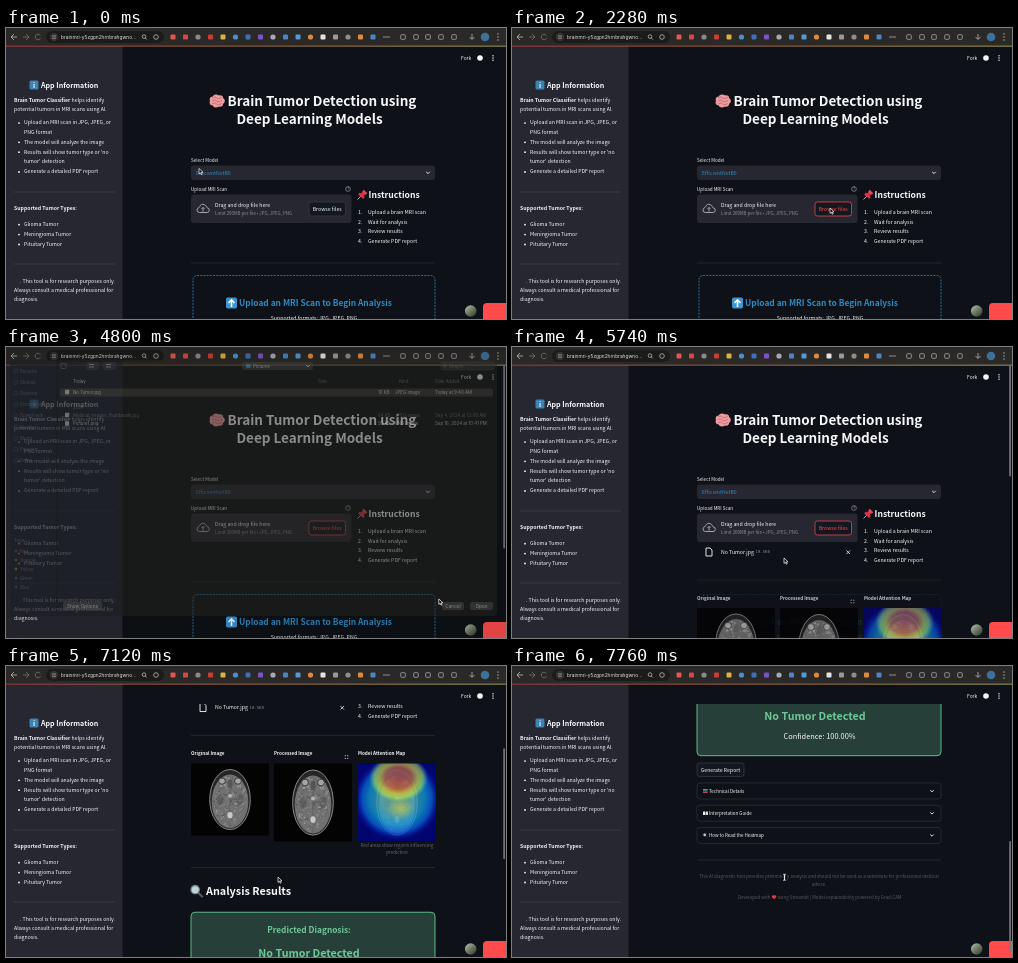
Recreate the animation shown at these times as an HTML page with a canvas. Size 500 by 291 pixels, loop 8 s.

```html
<!DOCTYPE html>
<html lang="en">
<head>
<meta charset="utf-8">
<title>Brain Tumor Detection</title>
<style>
html, body { margin: 0; width: 100%; height: 100%; overflow: hidden; background: #0e1117; }
canvas { display: block; width: 500px; height: 291px; }
</style>
</head>
<body>
<canvas id="stage"></canvas>
<script>
const W = 500, H = 291, LOOP = 8000;
const canvas = document.getElementById('stage');
const ratio = window.devicePixelRatio || 1;
canvas.width = W * ratio;
canvas.height = H * ratio;
const c = canvas.getContext('2d');

const SANS = '"Noto Sans CJK JP","Noto Sans CJK SC","Noto Sans CJK KR","Noto Sans CJK","Open Sans",sans-serif';
const UI = 'Inter,Roboto,sans-serif';
const MONO = '"Noto Sans Mono","DejaVu Sans Mono",monospace';
const WHITE = '#f7f8fa', GREY = '#8b8d95', PANEL = '#262730', BG = '#0e1117';
const RED = '#ff4b4b', BLUE = '#2d8bc5', GREEN = '#6fc897', EDGE = '#3b3d46';

const SCROLL = [[6050, 0], [6500, 66], [6760, 66], [6800, 75], [7120, 163], [7420, 300], [7560, 300], [7760, 401]];
const POINTER = [[180, 193, 140.5], [980, 243, 151.5], [1220, 246, 152.5], [1900, 318, 180], [2700, 318, 180],
  [3440, 266.5, 158.5], [3850, 85, 46], [4150, 85, 46], [4550, 474, 258], [4650, 474, 258],
  [4800, 433, 252], [5600, 272, 211]];
const DIALOG = [[2850, 0], [3440, .62], [3800, .85], [4350, .85], [4800, .45], [5100, 0]];
const RESULTS = [[5300, 0], [5850, 1]];

// Linear interpolation through [time, ...values] rows.
function track(rows, t) {
  if (t <= rows[0][0]) return rows[0].slice(1);
  for (let i = 1; i < rows.length; i++) {
    const a = rows[i - 1], b = rows[i];
    if (t <= b[0]) {
      const k = (t - a[0]) / (b[0] - a[0]);
      return a.slice(1).map((v, j) => v + (b[j + 1] - v) * k);
    }
  }
  return rows[rows.length - 1].slice(1);
}

function text(s, x, y, size, o = {}) {
  c.font = `${o.bold ? 700 : 400} ${size}px ${o.font || SANS}`;
  c.fillStyle = o.color || WHITE;
  c.textAlign = o.align || 'left';
  c.fillText(s, x, y + size * .36);
  return c.measureText(s).width;
}

function box(x, y, w, h, r, fill, stroke, line = .7) {
  c.beginPath();
  c.roundRect(x, y, w, h, r);
  if (fill) { c.fillStyle = fill; c.fill(); }
  if (stroke) { c.strokeStyle = stroke; c.lineWidth = line; c.stroke(); }
}

function oval(x, y, rx, ry, fill, stroke, line = .8) {
  c.beginPath();
  c.ellipse(x, y, rx, ry, 0, 0, 7);
  if (fill) { c.fillStyle = fill; c.fill(); }
  if (stroke) { c.strokeStyle = stroke; c.lineWidth = line; c.stroke(); }
}

function line(points, color, width = .8) {
  c.beginPath();
  points.forEach(([x, y], i) => i ? c.lineTo(x, y) : c.moveTo(x, y));
  c.strokeStyle = color;
  c.lineWidth = width;
  c.stroke();
}

function faded(alpha, draw) {
  if (alpha <= 0) return;
  c.save();
  c.globalAlpha *= Math.min(1, alpha);
  draw();
  c.restore();
}

function gradient(g, stops) {
  stops.forEach(([k, v]) => g.addColorStop(k, v));
  return g;
}

const rule = (x, y, w, color = '#2b2e37') => line([[x, y], [x + w, y]], color, .7);
const chevron = (x, y) => line([[x - 1.8, y - .9], [x, y + .9], [x + 1.8, y - .9]], WHITE, .9);

function brainIcon(x, y) {
  for (let i = 0; i < 7; i++) {
    const a = i * .9;
    oval(x + Math.cos(a) * 4.5, y + Math.sin(a) * 3.6, 3.3, 3, '#ee9d9f');
  }
  oval(x, y, 4.5, 4, '#ee9d9f');
  for (let i = -1; i < 2; i++) {
    line([[x - 5, y + i * 3], [x - 2, y + i * 3 - 1.2], [x + 1, y + i * 3 + 1], [x + 5, y + i * 3 - .5]], '#bc6973', .8);
  }
}

function pinIcon(x, y) {
  line([[x - 4.5, y + 4.5], [x, y]], '#b9c0c8', .9);
  line([[x - 3, y - 1.5], [x + 2, y + 3]], '#dd3344', 2.4);
  line([[x - 1, y + 1], [x + 3, y - 3]], '#dd3344', 3.6);
  line([[x + 1, y - 4.5], [x + 4.5, y - 1]], '#ee4656', 2.2);
}

function lensIcon(x, y, r) {
  line([[x, y], [x + r * 1.6, y + r * 1.6]], '#555b63', r * .5);
  oval(x - r * .2, y - r * .2, r, r, '#bcd3de', '#747c84', r * .3);
}

function arrowIcon(x, y) {
  box(x - 5.5, y - 5.5, 11, 11, 1.8, '#3b94d4');
  line([[x, y + 4], [x, y - 3]], '#fff', 1.6);
  line([[x - 3, y], [x, y - 3.2], [x + 3, y]], '#fff', 1.5);
}

function browserBar() {
  box(0, 0, W, 18, 0, '#2a2927');
  const icon = '#b9b8b5';
  line([[11, 9], [5, 9], [8, 6]], icon);
  line([[5, 9], [8, 12]], icon);
  line([[17, 9], [23, 9], [20, 6]], '#74736f');
  line([[23, 9], [20, 12]], '#74736f');
  c.beginPath(); c.arc(32, 9, 2.8, .4, 5.7); c.stroke();
  box(40, 3, 118, 12, 6, '#1b1b1a');
  oval(48, 9, 4.2, 4.2, '#343331');
  line([[46, 8], [50, 8]], icon, .7);
  line([[46, 10.2], [50, 10.2]], icon, .7);
  text('brainmri-y5zgpn2hrnbrahgwno...', 55, 9, 4.8, { font: UI, color: '#deddda' });
  oval(138, 8.6, 1.8, 1.8, null, icon);
  line([[139.3, 10], [140.8, 11.5]], icon);
  oval(150, 9, 2.3, 2.3, null, icon);
  const tints = ['#e0574f', '#d84747', '#8b8b8b', '#c93d35', '#d9b13f', '#4a90d0', '#3f6fb5', '#7c53c7', '#a7abb0',
    '#4a86c5', '#4f9bd8', '#dd8a3e', '#e4e4e2', '#9a9a98', '#8e8e88', '#dd8a3e', '#4a86c5'];
  tints.forEach((tint, i) => i % 3 === 2
    ? oval(167 + i * 12.5, 9, 2.6, 2.6, tint)
    : box(164.5 + i * 12.5, 6.5, 5, 5, 1, tint));
  rule(377, 9, 7, icon);
  [397, 410, 422, 435, 448].forEach(x => box(x - 2.3, 6.7, 4.6, 4.6, .8, null, icon));
  line([[466, 6], [466, 11]], icon);
  line([[463.5, 9], [466, 11.5], [468.5, 9]], icon);
  oval(479, 9, 4.3, 4.3, '#3e7199');
  [6, 9, 12].forEach(y => oval(492, y, .7, .7, icon));
  const strip = gradient(c.createLinearGradient(0, 0, W, 0), [[0, '#c63f3d'], [1, '#c9c66a']]);
  box(0, 17.8, W, .8, 0, strip);
}

function sidebar() {
  box(0, 18, 116.5, H - 18, 0, PANEL);
  box(23.5, 52.5, 9, 9, 1.5, '#3b83b2');
  text('i', 28, 57, 7, { bold: true, align: 'center' });
  text('App Information', 35, 57, 7.1, { bold: true });
  const w = text('Brain Tumor Classifier', 8, 72, 5.2, { bold: true });
  text(' helps identify', 8 + w, 72, 5.2);
  text('potential tumors in MRI scans using AI.', 8, 81.5, 5.2);
  const item = (s, y, dot = true) => {
    if (dot) oval(13, y + .5, .9, .9, WHITE);
    text(s, 18, y, 5.2);
  };
  item('Upload an MRI scan in JPG, JPEG, or', 94.6);
  item('PNG format', 104.1, false);
  item('The model will analyze the image', 113.8);
  item('Results will show tumor type or \'no', 123.7);
  item('tumor\' detection', 133.2, false);
  item('Generate a detailed PDF report', 143.5);
  rule(8, 164, 101, '#42444c');
  text('Supported Tumor Types:', 8, 180, 5.2, { bold: true });
  ['Glioma Tumor', 'Meningioma Tumor', 'Pituitary Tumor'].forEach((s, i) => item(s, 196.2 + i * 9.9));
  rule(8, 236, 101, '#42444c');
  text('. This tool is for research purposes only.', 14, 253.5, 5.2);
  text('Always consult a medical professional for', 8, 262, 5.2);
  text('diagnosis.', 8, 271, 5.2);
}

function form(active) {
  brainIcon(211, 73);
  text('Brain Tumor Detection using', 221.5, 73, 13.5, { bold: true });
  text('Deep Learning Models', 303.5, 91.5, 13.5, { bold: true, align: 'center' });
  text('Select Model', 185, 132, 4.6);
  box(185, 137.5, 244, 14.5, 3, PANEL);
  text('EfficientNetB0', 190, 144.8, 5.2, { color: BLUE });
  chevron(422, 144.7);
  text('Upload MRI Scan', 185, 161, 4.6);
  oval(342, 161, 2.4, 2.4, null, '#a5a7ae', .6);
  text('?', 342, 161, 3.6, { align: 'center', color: '#c4c5ca' });
  box(185, 166.5, 160.5, 28.5, 3, PANEL);
  const cloud = '#a5a8b0';
  c.beginPath();
  c.arc(193.5, 182, 2.5, 1.6, 4.5);
  c.arc(197, 180, 3.6, 3.5, 5.9);
  c.arc(201, 182.2, 2.3, 4.8, 1.5);
  c.closePath();
  c.strokeStyle = cloud; c.lineWidth = 1; c.stroke();
  line([[197, 183.5], [197, 179.5]], cloud, 1);
  line([[195.4, 181], [197, 179.4], [198.6, 181]], cloud, .9);
  text('Drag and drop file here', 209, 177, 5.2);
  text('Limit 200MB per file • JPG, JPEG, PNG', 209, 185.5, 4.45, { color: GREY });
  box(303, 174, 36.5, 14, 2.5, '#131720', active ? RED : EDGE);
  text('Browse files', 321.2, 181, 5.2, { align: 'center', color: active ? RED : WHITE });
  pinIcon(356, 167);
  text('Instructions', 362.6, 167, 8.6, { bold: true });
  ['Upload a brain MRI scan', 'Wait for analysis', 'Review results', 'Generate PDF report'].forEach((s, i) => {
    text(`${i + 1}.`, 352, 184 + i * 9.7, 5.2);
    text(s, 362, 184 + i * 9.7, 5.2);
  });
}

function invitation() {
  rule(185, 235, 244);
  c.setLineDash([2, 1.2]);
  box(187, 247.5, 242, 80, 4, null, BLUE, .8);
  c.setLineDash([]);
  arrowIcon(225.5, 275);
  text('Upload an MRI Scan to Begin Analysis', 233, 275, 8.4, { bold: true, color: BLUE });
  text('Supported formats: JPG, JPEG, PNG', 308, 290, 5.2, { align: 'center' });
}

function scan(x, y, w, h) {
  box(x, y, w, h, 1, '#030303');
  c.save();
  c.translate(x + w * .5, y + h * .5);
  c.scale(w / 78, h / 78);
  oval(0, 0, 20.3, 32.5, '#262626', '#8c8c8c', 1);
  oval(0, 2, 18.3, 29, '#707070');
  let seed = 7;
  const rnd = () => (seed = (seed * 16807) % 2147483647) / 2147483647;
  for (let i = 0; i < 260; i++) {
    const a = rnd() * 6.28, d = Math.sqrt(rnd()) * .95;
    const px = Math.cos(a) * 17.5 * d, py = 2 + Math.sin(a) * 28 * d, turn = rnd() * 6.28, l = 1 + rnd() * 2;
    const v = 80 + rnd() * 85 | 0;
    line([[px, py], [px + Math.cos(turn) * l, py + Math.sin(turn) * l]], `rgb(${v},${v},${v})`, 1);
  }
  [-1, 1].forEach(s => {
    oval(s * 8, -20, 3.4, 3.4, '#a5a5a5', '#3a3a3a', 1);
    oval(s * 10, 0, 3.5, 6, 'rgba(70,70,70,.4)');
  });
  line([[0, -12], [0, 30]], 'rgba(60,60,60,.5)', .7);
  oval(0, -17, 2.4, 5, '#555');
  oval(0, -4, 2, 2, '#b5b5b5');
  oval(0, 17, 2.6, 3.4, '#c9c9c9');
  c.restore();
}

function heatmap(x, y, s) {
  scan(x, y, s, s);
  const glow = (cx, cy, rx, ry, stops) => {
    c.save();
    c.translate(x + cx * s, y + cy * s);
    c.scale(rx * s, ry * s);
    c.fillStyle = gradient(c.createRadialGradient(0, 0, 0, 0, 0, 1), stops);
    c.fillRect(-1, -1, 2, 2);
    c.restore();
  };
  c.save();
  c.beginPath(); c.rect(x, y, s, s); c.clip();
  faded(.55, () => {
    box(x, y, s, s, 0, '#0508c8');
    glow(.5, .45, .56, .54, [[0, '#9cf070'], [.35, '#70f0a0'], [.62, '#18dcea'], [.8, '#0a86f5'], [1, 'rgba(5,8,200,0)']]);
    glow(.52, .19, .38, .3, [[0, '#d80800'], [.45, '#f03800'], [.65, '#ffc800'], [.82, 'rgba(230,255,40,.8)'], [1, 'rgba(130,255,120,0)']]);
    glow(.55, .58, .18, .14, [[0, 'rgba(255,230,40,.8)'], [1, 'rgba(255,230,40,0)']]);
  });
  c.restore();
}

function fileRow() {
  line([[194, 201], [198, 201], [200, 203], [200, 209], [194, 209], [194, 201]], WHITE, .9);
  text('No Tumor.jpg', 209, 205, 5.2);
  text('18.5KB', 243.5, 205, 4, { font: MONO, color: GREY });
  line([[334.5, 203.5], [338, 207]], WHITE);
  line([[338, 203.5], [334.5, 207]], WHITE);
}

function results() {
  rule(185, 233, 244);
  const head = { bold: true };
  text('Original Image', 185, 251, 4.65, head);
  text('Processed Image', 268, 251, 4.65, head);
  text('Model Attention Map', 352, 251, 4.65, head);
  c.setLineDash([1.4, 1.6]);
  c.lineDashOffset = .7;
  line([[339, 253], [342, 253], [342, 256], [339, 256], [339, 253]], WHITE, .7);
  c.setLineDash([]);
  scan(185, 261, 78, 72);
  scan(268, 261, 78, 78);
  heatmap(352, 261, 78);
  const note = { align: 'center', color: '#666974' };
  text('Red areas show regions influencing', 391, 342.7, 4.45, note);
  text('prediction', 391, 350, 4.45, note);
  rule(185, 365, 244);
  lensIcon(190, 388, 4.2);
  text('Analysis Results', 200, 389, 10.8, head);
  box(185, 409.7, 244, 81, 4, '#263f38', '#5bbd84', 1);
  const good = { bold: true, align: 'center', color: GREEN };
  text('Predicted Diagnosis:', 303, 427, 8.3, good);
  text('No Tumor Detected', 303, 451, 10.7, good);
  text('Confidence: 100.00%', 307.5, 471, 7.4, { align: 'center' });
  box(185, 498, 47, 13.5, 2.5, '#131720', EDGE);
  text('Generate Report', 208.5, 504.7, 5.2, { align: 'center' });
  ['Technical Details', 'Interpretation Guide', 'How to Read the Heatmap'].forEach((s, i) => {
    const y = 526 + i * 22.2;
    box(185, y - 8, 244, 16, 3, null, '#30333c');
    if (i === 0) ['#58a866', '#4b83c4', '#d05545'].forEach((v, j) => box(191, y - 2 + j * 1.4, 4.6, 1.1, 0, v));
    if (i === 1) { box(191, y - 1.6, 2.3, 3.5, .3, '#e9e9e9'); box(193.7, y - 1.6, 2.3, 3.5, .3, '#d8d8d8'); }
    if (i === 2) lensIcon(193, y - .3, 1.4);
    text(s, 197, y, 4.5);
    chevron(420, y);
  });
  rule(185, 595, 244);
  const foot = { align: 'center', color: '#565962' };
  text('This AI diagnostic tool provides preliminary analysis and should not be used as a substitute for professional medical', 307, 611, 4.48, foot);
  text('advice.', 307, 619, 4.48, foot);
  const left = 'Developed with ', right = ' using Streamlit | Model explainability powered by Grad-CAM';
  const w = text(left, 226, 632, 4.48, { color: foot.color });
  const hx = 226 + w;
  oval(hx + 1.5, 631.5, 1.2, 1.2, '#e23b45');
  oval(hx + 3.5, 631.5, 1.2, 1.2, '#e23b45');
  c.beginPath(); c.moveTo(hx + .4, 632); c.lineTo(hx + 4.6, 632); c.lineTo(hx + 2.5, 634.3); c.fill();
  text(right, hx + 5, 632, 4.48, { color: foot.color });
}

function overlay() {
  text('Fork', 455, 30, 4.9);
  oval(474, 30, 2.8, 2.8, WHITE);
  [27.8, 30, 32.2].forEach(y => oval(487, y, .7, .7, WHITE));
  oval(464.7, 283, 5.8, 5.8, gradient(c.createLinearGradient(459, 277, 470, 289),
    [[0, '#b8c6bd'], [.5, '#6d7b60'], [1, '#2e3530']]));
  box(477, 275, 30, 24, 4, RED);
}

function scrollbar(scroll, long) {
  box(497.3, 18.5 + scroll * .39, 1.6, long ? 111 : 183, .8, '#7b7c81');
}

function dialogPanel() {
  box(4, 13, 487, 256, 4, '#282620');
  box(4, 13, 112, 256, 4, '#181b2c');
  line([[51, 13], [51, 269]], '#11110f');
}

function dialogContent(selected) {
  const small = (s, x, y, color = '#e5e5e2') => text(s, x, y, 4.4, { font: UI, color });
  const dim = '#85857f', faint = '#70727c';
  ['Recents', 'Shared', 'Desktop', 'Documents', 'Downloads', 'Movies', 'Music', 'Pictures', 'Home'].forEach((s, i) => {
    const y = 24 + i * 11.2;
    box(8, y - 1.8, 3.6, 3.6, .8, null, '#355779');
    small(s, 14, y, faint);
  });
  small('Tags', 8, 193, faint);
  ['Red', 'Orange', 'Yellow', 'Green', 'Blue'].forEach((s, i) => {
    const y = 204 + i * 9;
    oval(10, y, 1.4, 1.4, ['#8d3c36', '#8d642e', '#857a33', '#3b6d42', '#31587e'][i]);
    small(s, 14, y, faint);
  });
  box(55, 16.5, 5, 5, 1, null, dim);
  [80, 97].forEach(x => {
    box(x, 15, 13, 8, 2, '#3a3a37');
    [17.5, 20].forEach(y => rule(x + 3, y, 5, '#ddd'));
  });
  box(236, 15, 71, 8, 2, '#42423f');
  box(240, 17.2, 4.5, 3.5, .6, '#4b9bd2');
  small('Pictures', 247, 19);
  chevron(302, 19);
  box(435, 15, 53, 8, 2, '#32322f', '#4d4d49', .5);
  oval(439, 18.7, 1.4, 1.4, null, dim, .6);
  small('Search', 443, 19, dim);
  small('Today', 67, 34);
  [['Size', 312], ['Kind', 393], ['Date Added', 429]].forEach(([s, x]) => small(s, x, 34, dim));
  if (selected) box(54, 41.5, 433, 8, 2, '#45453f');
  const row = (name, y, size, kind, date, tone) => {
    box(59, y - 2.2, 4.2, 4.4, .4, '#d5d5d5');
    small(name, 67, y, tone);
    small(size, 372, y, tone);
    small(kind, 389, y, tone);
    small(date, 429, y, tone);
  };
  row('No Tumor.jpg', 45, '10 KB', 'JPEG image', 'Today at 9:40 AM');
  small('2024', 67, 60, dim);
  row('Medical_images_thumbnails.jpg', 68, '64 KB', 'JPEG image', 'Sep 4, 2024 at 12:00 AM', dim);
  row('Picture1.png', 76.5, '92 KB', 'PNG image', 'Sep 16, 2024 at 10:41 PM');
  const button = (s, x, w, color) => {
    box(x, 255, w, 8, 2, '#50504d');
    text(s, x + w / 2, 259, 4.7, { font: UI, align: 'center', color });
  };
  button('Show Options', 57, 39, '#f2f2ef');
  button('Cancel', 436, 22, '#f2f2ef');
  button('Open', 464, 23, selected ? '#fff' : '#777772');
}

function pointer(x, y, beam) {
  if (beam) {
    line([[x + .5, y - 2.5], [x + .5, y + 3]], '#fff', .9);
    [-2.7, 3.2].forEach(d => rule(x - 1, y + d, 3, '#fff'));
    return;
  }
  c.beginPath();
  [[0, 0], [0, 5.4], [1.3, 4.2], [2.2, 6.2], [3.2, 5.8], [2.3, 3.9], [4, 3.8]].forEach(([a, b]) => c.lineTo(x + a, y + b));
  c.closePath();
  c.fillStyle = '#080808';
  c.fill();
  c.strokeStyle = '#fff';
  c.lineWidth = .7;
  c.stroke();
}

function render(t) {
  c.setTransform(ratio, 0, 0, ratio, 0, 0);
  box(0, 0, W, H, 0, BG);

  const [ready] = track(RESULTS, t);
  const [scroll] = track(SCROLL, t);
  c.save();
  c.beginPath(); c.rect(117, 38, W - 117, H - 38); c.clip();
  c.translate(0, -scroll);
  form(t >= 1000);
  faded(1 - ready, invitation);
  if (t >= 5150) fileRow();
  faded(ready, results);
  c.restore();

  sidebar();
  browserBar();
  overlay();
  // The scrollbar appears with the first layout change and stays while reading.
  if (t >= 2850) scrollbar(scroll, ready > 0);

  const [shown] = track(DIALOG, t);
  faded(shown * .25, () => box(0, 0, W, H, 0, '#000'));
  faded(shown, dialogPanel);
  faded(t < 4200 ? shown * 1.5 : shown, () => dialogContent(t >= 4000));

  pointer(...track(POINTER, t), t >= 7650);
}

function tick() {
  render(performance.now() % LOOP);
  requestAnimationFrame(tick);
}
tick();
</script>
</body>
</html>
```
